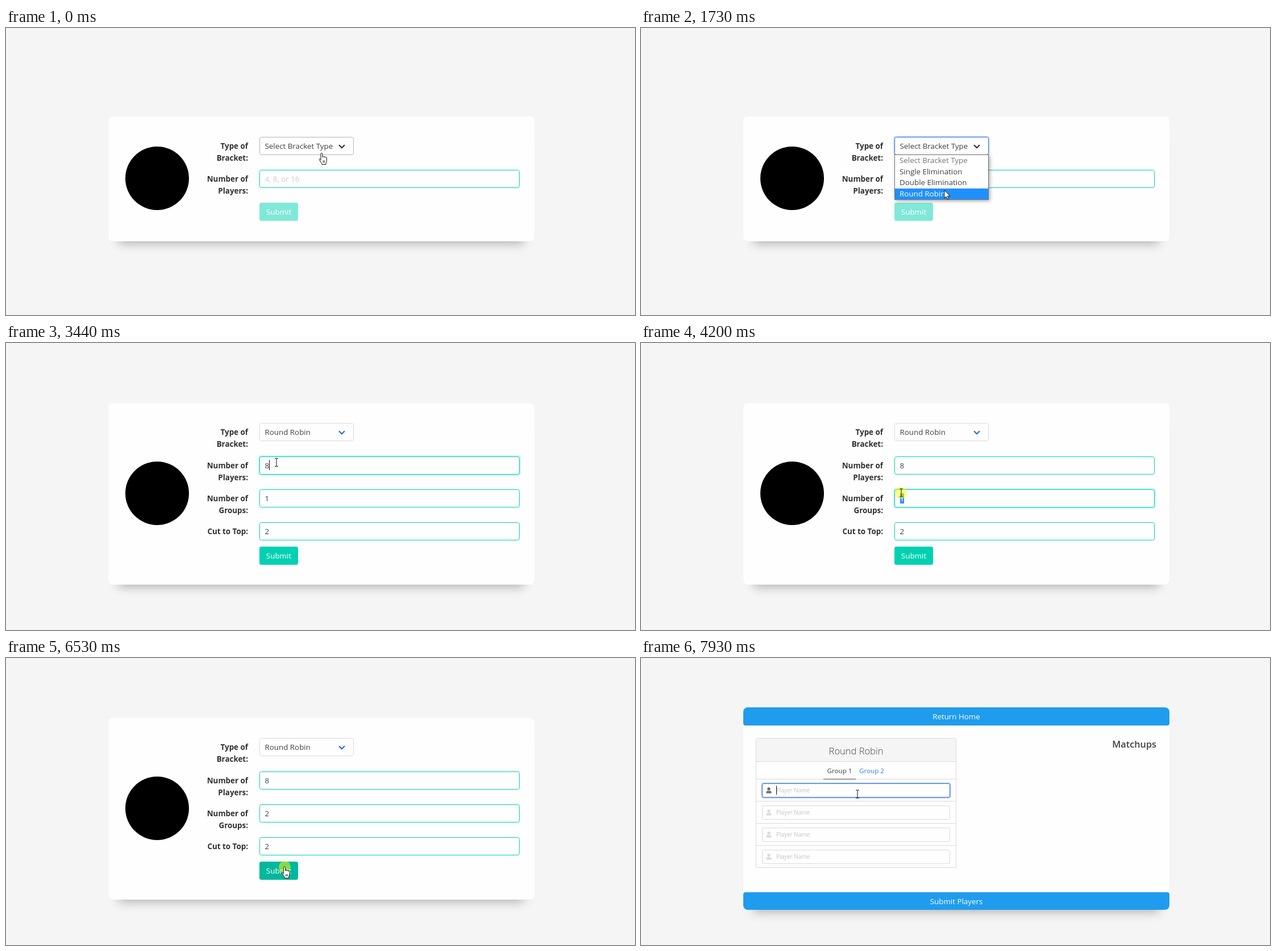
Write an HTML page that moves like this. It is 1107 by 506 pixels and loops after 8 s.

```html
<!DOCTYPE html>
<html lang="en">
<head>
<meta charset="utf-8">
<title>Bracket setup</title>
<style>
html, body { margin: 0; width: 100%; height: 100%; overflow: hidden; background: #f5f5f5; }
body { position: relative; font: 13.35px "Open Sans", "Noto Sans", sans-serif; color: #404040; }
div, svg { position: absolute; box-sizing: border-box; }
div { white-space: nowrap; }
.page { inset: 0; }
.card { background: #fefefe; border-radius: 8px; box-shadow: 0 22px 17.6px -17.6px rgba(0,0,0,.3); }
.logo { background: #000; border-radius: 50%; }
.label { font-weight: 700; font-size: 13.4px; color: #303030; line-height: 21px; text-align: right; white-space: pre; }
.field { border: 1px solid #00d1b2; border-radius: 3.5px; padding-left: 8.5px; line-height: 30px; background: #fefefe; }
.field.focus { box-shadow: 0 0 0 2px rgba(0,209,178,.25); }
.field.bad { border-color: #ff3860; }
.empty { color: #c9cccb; }
.field.select { border-color: #dbdbdb; }
.field.select.hover { border-color: #b5b5b5; }
.field.select.focus { border-color: #3273dc; box-shadow: 0 0 0 2px rgba(50,115,220,.25); }
.marked { background: #3390ff; color: #fff; }
.caret { width: 1px; background: #111; }
.help { font-size: 9.97px; line-height: 16px; color: #ff3860; }
.button { background: #00d1b2; color: #fff; border-radius: 3.5px; text-align: center; font-size: 13.4px; line-height: 32px; }
.button.off { background: #80e8d8; }
.button.down { background: #00b89c; }
.list { border: 1px solid #767676; background: #fff; box-shadow: 2px 2px 6px rgba(0,0,0,.35); }
.option { padding-left: 8px; line-height: 19.4px; }
.option.on { background: #1e90ff; color: #fff; }
.option.none { color: #757575; }
.bar { background: #209cee; color: #fff; text-align: center; line-height: 32px; }
.panel { border: 1px solid #dbdbdb; border-radius: 3px 3px 0 0; }
.head { background: #f5f5f5; border-bottom: 1px solid #dbdbdb; font-weight: 300; font-size: 16.5px; line-height: 43px; text-align: center; }
.tab { font-size: 11.65px; line-height: 20px; }
.line { background: #dbdbdb; }
.title { font-weight: 600; font-size: 16.3px; line-height: 24px; text-align: right; }
.name { border: 1px solid #dbdbdb; border-radius: 3px; padding-left: 24px; font-size: 9.95px; line-height: 23px; color: #c4c4c4; }
.name svg { left: 6px; top: 6px; fill: #dbdbdb; }
.name.focus { border-color: #3273dc; box-shadow: 0 0 0 1.5px rgba(50,115,220,.4); }
.name.focus svg { fill: #6e6e6e; }
.spot { width: 21px; height: 21px; margin: -10.5px; border-radius: 50%; background: rgba(255,255,0,.5); }
.cursor { overflow: visible; stroke: #111; stroke-linejoin: round; fill: #fff; left: 0; top: 0; }
</style>
</head>
<body>
<svg id="cursor" class="cursor" width="1" height="1"><path/></svg>
<script>
function add(parent, cls, x, y, w, h, text = '') {
  const el = document.createElement('div');
  el.className = cls;
  el.style.cssText = `left:${x}px;top:${y}px;width:${w}px;height:${h}px`;
  el.textContent = text;
  parent.append(el);
  return el;
}
const show = (el, on) => { el.style.visibility = on ? 'inherit' : 'hidden'; };
const between = (t, a, b) => t >= a && t < b;

// Set-up form
const form = add(document.body, 'page', 0, 0, 1107, 506);
const card = add(form, 'card', 180, 156, 750, 219);
add(form, 'logo', 210, 209, 112, 112);
const rows = ['Type of\nBracket:', 'Number of\nPlayers:', 'Number of\nGroups:', 'Cut to Top:'].map((text, i) => {
  const label = add(form, 'label', 326, 0, 100, 42, text);
  const field = add(form, 'field', 446, 0, i ? 458 : 166, 32);
  const value = document.createElement('span');
  field.append(value);
  return { label, field, value };
});
const [type, players, groups, cut] = rows;
type.field.insertAdjacentHTML('beforeend',
  '<svg width="12" height="8" style="left:138px;top:12px" fill="none" stroke-width="2.3"><path d="M1 1.2l5 5 5-5"/></svg>');
const chevron = type.field.querySelector('svg');
const helps = [
  add(form, 'help', 446.5, 282.5, 400, 16, 'Please put a valid number of groups. Cannot split 1 groups evenly.'),
  add(form, 'help', 446.5, 344, 400, 16, 'Please put valid cutoff amount.')
];
const submit = add(form, 'button', 446, 308, 68, 32, 'Submit');
const caret = add(form, 'caret', 0, 0, 1, 18);
const list = add(form, 'list', 446, 223, 166, 80);
const options = ['Select Bracket Type', 'Single Elimination', 'Double Elimination', 'Round Robin']
  .map((text, i) => add(list, 'option' + (i ? '' : ' none'), 0, 0.4 + i * 19.4, 164, 19.4, text));

// Player entry
const entry = add(document.body, 'page', 0, 0, 1107, 506);
add(entry, 'card', 180, 87, 750, 357);
add(entry, 'bar', 180, 87, 750, 32, 'Return Home').style.borderRadius = '8px 8px 4px 4px';
add(entry, 'bar', 180, 413, 750, 31, 'Submit Players').style.borderRadius = '4px 4px 8px 8px';
add(entry, 'title', 707, 140, 200, 24, 'Matchups');
add(entry, 'panel', 202, 141, 353, 229);
add(entry, 'head', 203, 142, 351, 41, 'Round Robin');
add(entry, 'tab', 327.5, 189, 50, 20, 'Group 1');
add(entry, 'tab', 384, 189, 50, 20, 'Group 2').style.color = '#3284dc';
add(entry, 'line', 203, 213, 351, 1);
add(entry, 'line', 321, 213, 57, 1).style.background = '#4a4a4a';
const nameTops = [221, 260, 299, 338];
const names = nameTops.map((y, i) => {
  if (i) add(entry, 'line', 203, y - 8, 351, 1);
  const box = add(entry, 'name', 213, y, 331, 25, 'Player Name');
  box.insertAdjacentHTML('beforeend',
    '<svg width="10" height="11"><circle cx="5" cy="2.8" r="2.7"/><path d="M.4 10.5V9q0-2.8 2.8-2.8h3.6Q9.6 6.2 9.6 9v1.5z"/></svg>');
  return box;
});
const nameCaret = add(entry, 'caret', 238, 225, 1, 16);

// Card top, card height, then the tops of the four fields and the button
const layouts = [
  [156, 219.5, 192, 250, 250, 250, 308],
  [95, 342, 130, 188, 246, 308, 370],
  [106, 320, 141, 200, 258, 316, 359]
];

// Each move: first change, last change, steps, end x, end y, pointer ('auto' depends on what lies below)
const start = [555.5, 220.5, 'hand'];
const moves = [
  [120, 200, 2, 553.5, 218.5, 'hand'],
  [350, 430, 2, 555.5, 215.5, 'hand'],
  [970, 1120, 3, 546, 225, 'arrow'],
  [1350, 1730, 6, 534, 286, 'arrow'],
  [1810, 2040, 4, 532, 297, 'arrow'],
  [2190, 2190, 1, 532, 297, 'beam'],
  [2270, 2820, 8, 474.5, 204.5, 'auto'],
  [3140, 3210, 2, 476, 210.5, 'beam'],
  [3520, 3900, 6, 458, 264, 'auto'],
  [4280, 4350, 2, 440, 263.5, 'beam'],
  [4430, 4430, 1, 448.5, 263.5, 'beam'],
  [5440, 5900, 7, 489, 362, 'auto'],
  [6070, 6070, 1, 490, 368, 'hand'],
  [6680, 6680, 1, 490, 368, 'arrow'],
  [7000, 7550, 8, 381, 240, 'auto']
];
const clicks = [[580, 660], [2040, 2120], [2890, 3140], [3980, 4280], [6530, 6680], [7630, 7930]];
const pointers = {
  arrow: 'M0 0V14.2L3.2 11.2 5.5 16.3 7.7 15.3 5.4 10.4H10Z',
  hand: 'M-1.5 13V1.5Q-1.5 0 0 0T1.5 1.5V7.2Q1.5 6 2.9 6T4.3 7.4Q4.3 6.5 5.6 6.5T6.9 8Q6.9 7.3 8 7.3T9 8.8V13C9 16 7.5 16 7.5 20H.5C.5 17.5-2.2 15.5-4 12-4.8 10-3 9.2-1.5 11.3M2.8 13v4M5.1 13v4',
  beam: 'M-3-7H-1Q0-7 0-6 0-7 1-7H3M0-6V6M-3 7H-1Q0 7 0 6 0 7 1 7H3'
};

function pointerAt(y, t, layout) {
  const over = (tops, h) => tops.some(top => y >= top && y < top + h);
  if (t >= 6680) return over(nameTops, 25) ? 'beam' : 'arrow';
  if (over(layout.slice(3, 6), 32)) return 'beam';
  return y >= layout[6] ? 'hand' : 'arrow';
}

function locate(t, layout) {
  let [x, y, kind] = start;
  for (const [from, to, steps, endX, endY, shape] of moves) {
    if (t < from) break;
    const gap = (to - from) / (steps - 1 || 1) || 1;
    const p = Math.min(Math.floor((t - from) / gap + 0.05) + 1, steps) / steps;
    const eased = p * p * (3 - 2 * p);
    x += (endX - x) * eased;
    y += (endY - y) * eased;
    kind = shape === 'auto' ? pointerAt(y, t, layout) : shape;
  }
  return { x, y, kind };
}

const cursor = document.getElementById('cursor');
const cursorPath = cursor.firstChild;
const spot = add(document.body, 'spot', 0, 0, 21, 21);
document.body.append(cursor);

function drawForm(t, layout, mouse) {
  const [top, height, ...tops] = layout;
  const chosen = t >= 2190, valid = t >= 3440;
  card.style.top = top + 'px';
  card.style.height = height + 'px';
  rows.forEach(({ label, field }, i) => {
    field.style.top = tops[i] + 'px';
    label.style.top = tops[i] + 5.5 + 'px';
    show(field, i < 2 || chosen);
    show(label, i < 2 || chosen);
  });
  submit.style.top = tops[4] + 'px';
  submit.className = 'button' + (valid ? t >= 6530 ? ' down' : '' : ' off');
  helps.forEach(help => show(help, chosen && !valid));

  type.value.textContent = chosen ? 'Round Robin' : 'Select Bracket Type';
  type.field.className = 'field select' + (chosen ? '' : ' hover') + (between(t, 580, 2890) ? ' focus' : '');
  chevron.style.stroke = chosen ? '#2a6fcc' : '#333';
  players.value.textContent = valid ? '8' : '4, 8, or 16';
  players.value.className = valid ? '' : 'empty';
  players.field.className = 'field' + (between(t, 2890, 3980) ? ' focus' : '');
  groups.value.textContent = t >= 5210 ? '2' : '1';
  groups.value.className = between(t, 4130, 5210) ? 'marked' : '';
  groups.field.className = 'field' + (valid ? '' : ' bad') + (between(t, 3980, 6530) ? ' focus' : '');
  cut.value.textContent = '2';
  cut.field.className = 'field' + (valid ? '' : ' bad');

  const caretOn = between(t, 2890, 3980) || between(t, 5210, 5740) || between(t, 6300, 6530);
  show(caret, caretOn);
  caret.style.left = (valid ? 463 : 455) + 'px';
  caret.style.top = tops[t < 3980 ? 1 : 2] + 6 + 'px';

  show(list, between(t, 660, 2120));
  const hovered = t < 1350 ? 0 : Math.floor((mouse.y - 224.5) / 19.4);
  options.forEach((option, i) => option.classList.toggle('on', i > 0 && i === hovered));
}

function draw(t) {
  const layout = layouts[t < 2190 ? 0 : t < 3440 ? 1 : 2];
  const mouse = locate(t, layout);
  const second = t >= 6680;
  show(form, !second);
  show(entry, second);
  if (second) {
    names[0].classList.toggle('focus', t >= 7630);
    show(nameCaret, t >= 7630);
  } else drawForm(t, layout, mouse);

  show(spot, clicks.some(([a, b]) => between(t, a, b)));
  spot.style.left = mouse.x - (mouse.kind === 'beam' ? 1 : 0) + 'px';
  spot.style.top = mouse.y + 'px';
  show(cursor, !between(t, 4830, 5440));
  cursor.style.transform = `translate(${mouse.x}px,${mouse.y}px)`;
  cursorPath.setAttribute('d', pointers[mouse.kind]);
  cursorPath.style.fill = mouse.kind === 'beam' ? 'none' : '#fff';
}

const began = performance.now();
function tick() {
  draw((performance.now() - began) % 8000);
  requestAnimationFrame(tick);
}
tick();
</script>
</body>
</html>
```
